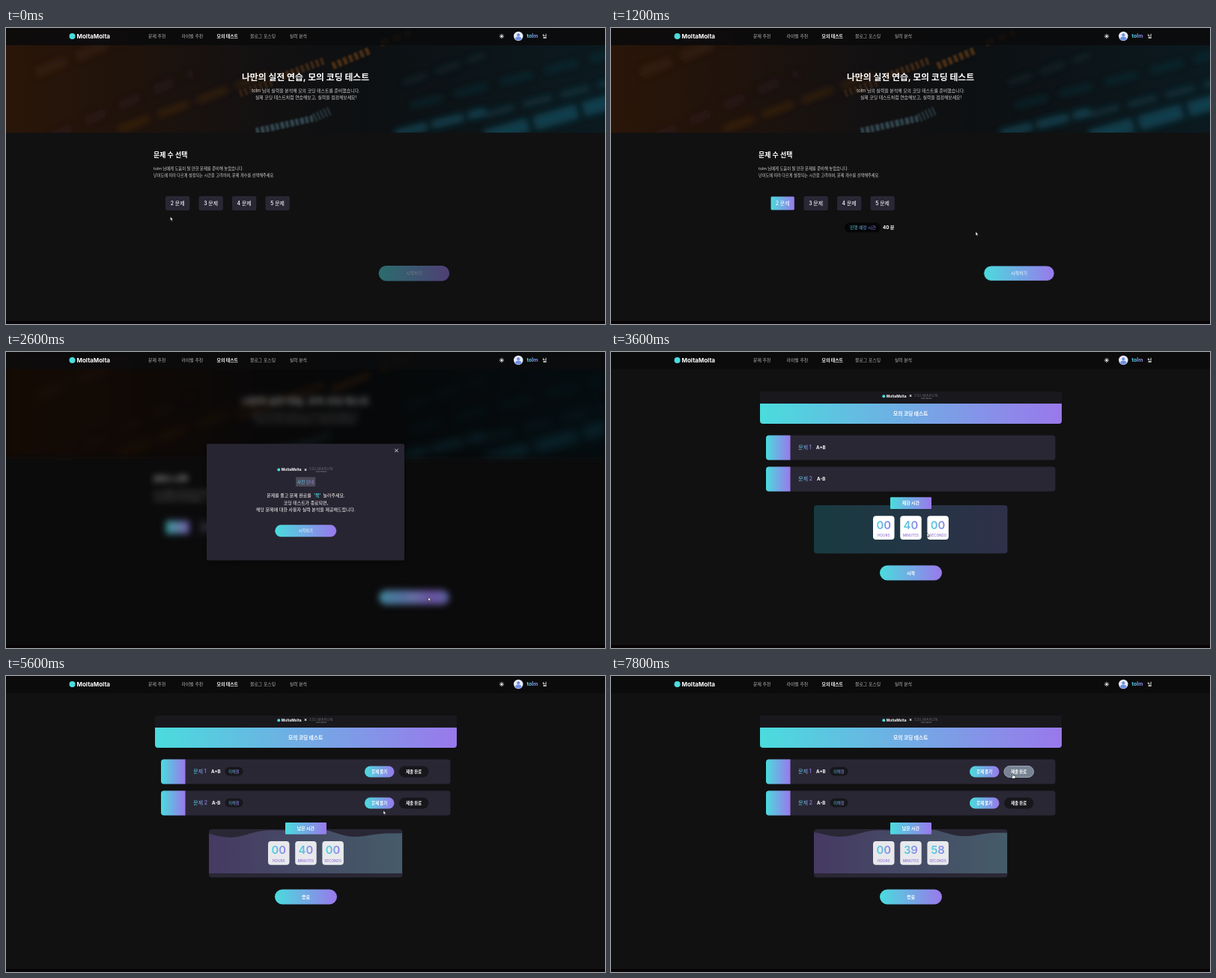
Animation of 800x396 px, one loop 8 s. Source, as an HTML page:

```html
<!DOCTYPE html>
<html lang="ko">
<head>
<meta charset="utf-8">
<title>모의 코딩 테스트</title>
<style>
  html, body { margin: 0; width: 100%; height: 100%; overflow: hidden; background: #111112; }
  svg { display: block; width: 100vw; height: 100vh; }
  text { font-family: Inter, "Noto Sans CJK KR", "Noto Sans CJK JP", sans-serif; white-space: pre; }
  .blurred { filter: blur(4px); }
</style>
</head>
<body>
<svg id="stage" viewBox="0 0 800 396"></svg>
<script>
const LOOP = 8000;
const BACK = '#111112', CYAN = '#4adcdd', PURPLE = '#9a78ec', PANEL = '#2a2735';
const SITE = 'MoltaMolta', PARTNER = 'SOLMARUN', USER = 'tolm';

// Markup helpers
const text = (x, y, str, size, { fill = '#fff', weight = 500, anchor = 'start', extra = '' } = {}) =>
  `<text x="${x}" y="${y}" font-size="${size}" font-weight="${weight}" fill="${fill}" text-anchor="${anchor}" ${extra}>${str}</text>`;
const mid = (x, y, str, size, opts) => text(x, y, str, size, { anchor: 'middle', ...opts });
const rect = (x, y, w, h, fill, r = 0, extra = '') =>
  `<rect x="${x}" y="${y}" width="${w}" height="${h}" rx="${r}" fill="${fill}" ${extra}/>`;
const gradient = (id, a, b) =>
  `<linearGradient id="${id}"><stop stop-color="${a}"/><stop offset="1" stop-color="${b}"/></linearGradient>`;
// Three-stop gradient twice as wide as its box, so that it can slide on hover
const slider = id =>
  `<linearGradient id="${id}" x1="0" x2="2"><stop stop-color="${CYAN}"/><stop offset=".5" stop-color="${PURPLE}"/><stop offset="1" stop-color="${CYAN}"/></linearGradient>`;
const streak = (x1, y1, x2, y2, color, width, opacity, dash = 'none') =>
  `<line x1="${x1}" y1="${y1}" x2="${x2}" y2="${y2}" stroke="${color}" stroke-width="${width}" opacity="${opacity}" stroke-dasharray="${dash}"/>`;

const GRAD = 'url(#brand)';

const defs = `<defs>
  ${gradient('brand', CYAN, PURPLE)}
  ${gradient('dim', '#183b40', '#2f3049')}
  ${gradient('wave', '#463a62', '#455c69')}
  ${slider('startFill')}${slider('runFill')}
  <linearGradient id="photo">
    <stop stop-color="#2a1609"/><stop offset=".22" stop-color="#1f130c"/>
    <stop offset=".42" stop-color="#131112"/><stop offset=".6" stop-color="#0d1012"/>
    <stop offset="1" stop-color="#0b1a20"/>
  </linearGradient>
  <filter id="soft" x="-20%" y="-20%" width="140%" height="140%"><feGaussianBlur stdDeviation="4"/></filter>
  <filter id="slight"><feGaussianBlur stdDeviation=".8"/></filter>
  <clipPath id="heroBox">${rect(0, 0, 800, 140, '#000')}</clipPath>
  <clipPath id="timerBox">${rect(271, 205, 258.5, 64.5, '#000', 4)}</clipPath>
</defs>`;

const rays = Array.from({ length: 8 }, (_, i) => {
  const angle = i * Math.PI / 4, dx = Math.cos(angle), dy = Math.sin(angle);
  return `<path d="M${662 + dx * 1.9} ${11 + dy * 1.9}L${662 + dx * 3.1} ${11 + dy * 3.1}" stroke="#fff" stroke-width=".9"/>`;
}).join('');

const NAV = [[190, '문제 추천'], [234.5, '라이벌 추천'], [281.5, '모의 테스트'], [326, '블로그 포스팅'], [378.7, '실력 분석']];
const header = rect(0, 0, 800, 23, '#0b0b0c', 0, 'opacity=".88"')
  + `<circle cx="88.5" cy="11" r="4" fill="${CYAN}"/>` + text(94.5, 14, SITE, 8, { weight: 700 })
  + NAV.map(([x, label], i) => text(x, 13, label, 5.9, i === 2 ? { weight: 700 } : { fill: '#b5b5b8', weight: 400 })).join('')
  + rays + '<circle cx="662" cy="11" r="1.5" fill="#fff"/>'
  + `<circle cx="684.3" cy="11" r="6.2" fill="#e9ebfb"/><circle cx="684.3" cy="9.3" r="2" fill="#6d8fe0"/>
     <path d="M680 15a4.3 3.6 0 0 1 8.6 0a6.2 6.2 0 0 1-8.6 0" fill="#6d8fe0"/>`
  + text(695.5, 13.2, USER, 7, { fill: GRAD, weight: 700 }) + text(716.5, 13.2, '님', 6.2, { weight: 600 });

const hero = `<g clip-path="url(#heroBox)">${rect(0, 0, 800, 140, 'url(#photo)')}
  <g filter="url(#soft)">
    ${streak(40, 60, 160, 12, '#4a2c22', 14, .35, '44 14')}${streak(150, 136, 350, 62, '#7a4212', 8, .28, '44 12')}
    ${streak(60, 146, 250, 60, '#3a2430', 12, .3, '30 20')}
    ${streak(520, 142, 640, 112, '#17637a', 12, .5, '44 6')}${streak(640, 146, 810, 98, '#15647a', 20, .5, '60 8')}
    ${streak(540, 104, 810, 34, '#14505f', 9, .25, '44 18')}${streak(640, 116, 810, 72, '#176074', 9, .3, '40 12')}
    ${streak(530, 74, 640, 36, '#2a4650', 8, .25, '34 12')}
  </g>
  <g filter="url(#slight)">
    ${streak(334, 138, 410, 121, '#55808f', 9, .5, '4 2.5 5 2')}${streak(412, 120, 432, 111, '#55808f', 12, .45, '2 3')}
    ${streak(312, 88, 358, 72, '#7c4a24', 10, .3, '4 3')}
    ${streak(368, 65, 424, 44, '#8a4f20', 10, .4, '4 3')}${streak(436, 51, 486, 30, '#96541e', 10, .45, '5 3')}
    ${streak(500, 20, 540, 6, '#a35a1d', 9, .4, '12 5')}
  </g></g>`
  + mid(400, 70, '나만의 실전 연습, 모의 코딩 테스트', 11.85, { weight: 700 })
  + mid(400.5, 86, `${USER} 님의 실력을 분석해 모의 코딩 테스트를 준비했습니다.`, 5.9, { fill: '#d6d6d8', weight: 400 })
  + mid(400.5, 95.3, '실제 코딩 테스트처럼 연습해보고, 실력을 점검해보세요!', 5.85, { fill: '#d6d6d8', weight: 400 });

const choices = [2, 3, 4, 5].map((n, i) => {
  const x = 213 + i * 44.5;
  return rect(x, 225, 32.3, 19, PANEL, 2, i ? '' : 'id="choice"') + mid(x + 16.1, 237.4, `${n} 문제`, 6.9);
}).join('');

const chooser = hero
  + text(197, 173, '문제 수 선택', 8.9, { weight: 600 })
  + text(197, 190.2, `${USER} 님에게 도움이 될 만한 문제를 준비해 놓았습니다.`, 5.3, { fill: '#d6d6d8', weight: 400 })
  + text(197, 199, '난이도에 따라 다르게 설정되는 시간을 고려하여, 문제 개수를 선택해주세요.', 5.17, { fill: '#d6d6d8', weight: 400 })
  + choices
  + `<g id="estimate">${rect(312, 260.7, 48, 12.6, '#050507', 6.3)}`
  + mid(336.3, 269.3, '진행 예정 시간', 5.75, { fill: GRAD }) + text(363, 269.4, '40 분', 6.2, { weight: 700 }) + '</g>'
  + `<g id="begin">${rect(497.7, 318, 94.5, 20.4, 'url(#startFill)', 10.2, 'id="beginBox"')}${mid(545, 330.4, '시작하기', 6)}</g>`;

const badges = y => `<circle cx="364.3" cy="${y}" r="2" fill="${CYAN}"/>`
  + text(367.8, y + 1.7, SITE, 4.8, { weight: 700 }) + mid(400, y + 2, '×', 6, { weight: 700 })
  + text(405, y + .8, PARTNER, 4.6, { fill: '#85838d', weight: 300, extra: 'letter-spacing=".75"' })
  + mid(421, y + 3.8, 'Code Practice', 2.2, { fill: '#85838d' });

const modal = rect(0, 23, 800, 369, '#000', 0, 'opacity=".32"')
  + rect(0, 23, 800, 117, '#000', 0, 'opacity=".25"')
  + rect(266, 122, 268, 160, '#000', 4, 'opacity=".3" filter="url(#soft)"')
  + rect(268, 122.7, 264, 156, '#282532', 2)
  + '<path d="M519.3 129.6l4.4 4.4m0-4.4l-4.4 4.4" stroke="#fff" stroke-width=".8"/>'
  + badges(157.6)
  + rect(387, 167.3, 26.3, 12.8, '#4b4958', 1) + mid(400.2, 176, '사전 안내', 5.8, { fill: GRAD })
  + mid(400.5, 194, `문제를 풀고 문제 완료를  <tspan fill="${CYAN}" font-weight="700">'꼭'</tspan>  눌러주세요.`, 5.95)
  + mid(400.5, 203.7, '코딩 테스트가 종료되면,', 5.95)
  + mid(400.5, 213.2, '해당 문제에 대한 사용자 실력 분석을 제공해드립니다.', 6)
  + rect(359.3, 231.3, 82, 16, GRAD, 8) + mid(400.3, 241.4, '시작하기', 5.2);

const row = (n, title, y, x) => rect(207, y, 386.5, 33, PANEL, 4)
  + `<path d="M239.5 ${y}H211q-4 0-4 4v25q0 4 4 4h28.5z" fill="${GRAD}"/>`
  + text(250.3, y + 18.8, `문제 ${n}`, 6.9, { fill: GRAD }) + text(x, y + 18.7, title, 6.2, { weight: 700 })
  + `<g class="running">${rect(292.5, y + 10.3, 24, 11.6, '#17161b', 5.8)}`
  + mid(304.4, y + 18.2, '미해결', 5.2, { fill: GRAD })
  + rect(479, y + 9, 39.5, 15, GRAD, 7.5) + mid(498.7, y + 18.5, '문제 풀기', 5.3, { weight: 600 })
  + rect(525, y + 9, 39.5, 15, '#17161b', 7.5, `id="submit${n}"`) + mid(544.7, y + 18.5, '제출 완료', 5.3, { weight: 600 }) + '</g>';

const cards = ['HOURS', 'MINUTES', 'SECONDS'].map((unit, i) => {
  const x = 350 + i * 36.2;
  return rect(x, 219.2, 28.5, 31.8, '#fff', 4, 'class="card"')
    + mid(x + 14.2, 236.7, '00', 14.8, { fill: GRAD, weight: 600, extra: 'class="digits"' })
    + mid(x + 14.2, 247.4, unit, 4.7, { fill: '#9273d8' });
}).join('');

const exam = rect(199, 53, 403, 16, '#19181d')
  + `<path d="M199 69H602v23q0 4-4 4H203q-4 0-4-4z" fill="${GRAD}"/>` + badges(59.3)
  + mid(400.2, 84.9, '모의 코딩 테스트', 6.7, { weight: 700 })
  + row(1, 'A+B', 111.5, 274) + row(2, 'A-B', 153.5, 275)
  + rect(271, 205, 258.5, 64.5, 'url(#dim)', 4, 'id="timerPanel"')
  + '<path id="wavePath" class="running" fill="url(#wave)" clip-path="url(#timerBox)"/>'
  + `<g id="timer">${rect(373, 194.2, 55, 15.8, GRAD, 1)}`
  + mid(400.4, 204.4, '', 6, { weight: 700, extra: 'id="timerLabel"' }) + cards + '</g>'
  + rect(359, 285.5, 83, 20, 'url(#runFill)', 10) + mid(400.4, 297.7, '', 6, { weight: 600, extra: 'id="runLabel"' });

const cursor = `<g id="cursor" stroke="#111" stroke-width=".5" stroke-linejoin="round" fill="#fff">
  <path id="arrow" d="M0 0V5.2L1.2 4.1L2 5.9L2.9 5.5L2.1 3.8H3.7Z"/>
  <path id="hand" d="M-.6 0q.6-.7 1.2 0V2.2L2.9 2.7q.7.2.6 1L3 6H-.7L-2.2 3.6q.2-.8 1.6.2Z"/></g>`;

const $ = id => document.getElementById(id);
$('stage').innerHTML = defs + rect(0, 0, 800, 396, BACK)
  + `<g id="chooser">${chooser}</g><g id="modal">${modal}</g><g id="exam">${exam}</g>`
  + header + rect(0, 392, 800, 4, '#080306') + cursor;

const all = name => [...document.querySelectorAll('.' + name)];
const running = all('running'), digits = all('digits'), cardBoxes = all('card');
const show = (el, on) => el.style.display = on ? '' : 'none';

// Moments of the story, in ms
const SELECT = 500, OPEN = 2000, EXAM = 3300, RUN = 5200, TICK = 5350;

// Cursor stops: time, x, y
const PATH = [[0, 219.5, 252.5], [200, 219.5, 252.5], [400, 228, 237], [750, 230, 237], [1200, 487, 272.5],
  [1600, 564, 328], [2600, 564, 328], [3050, 422, 242], [3650, 422, 242], [4300, 422.3, 287], [5200, 422.3, 287],
  [5600, 504, 180], [6000, 504, 176], [6600, 536.7, 131], [LOOP, 536.7, 131]];
// Time spans with the hand pointer
const HAND = [[350, 800], [1450, 2000], [2950, 3300], [4250, 5260], [6400, LOOP]];

const clamp = v => Math.min(1, Math.max(0, v));
const ease = v => v * v * (3 - 2 * v);
const ramp = (t, from, length) => ease(clamp((t - from) / length));

function cursorAt(t) {
  const i = PATH.findIndex((p, k) => k && t <= p[0]);
  const [t0, x0, y0] = PATH[i - 1], [t1, x1, y1] = PATH[i];
  const k = ease((t - t0) / (t1 - t0));
  return [x0 + (x1 - x0) * k, y0 + (y1 - y0) * k];
}

function wave(t) {
  const s = (t - 5600) / 2200;
  let d = 'M271 264';
  for (let x = 271; x <= 530; x += 3) {
    const y = 209 + (5 - s) * Math.cos((x - 297 - 5 * s) / 29.4) + 2 * Math.cos((x - 300) / 12.7 - s * .6);
    d += `L${x} ${y.toFixed(2)}`;
  }
  return d + 'V264Z';
}

function slide(id, amount) {
  $(id).setAttribute('x1', -amount);
  $(id).setAttribute('x2', 2 - amount);
}

function render(t) {
  const selected = t >= SELECT, inExam = t >= EXAM, started = t >= RUN;
  const inModal = t >= OPEN && !inExam;

  show($('chooser'), !inExam);
  show($('modal'), inModal);
  show($('exam'), inExam);
  $('chooser').classList.toggle('blurred', inModal);
  // Active buttons carry a thin edge in the page colour
  for (const id of ['choice', 'beginBox']) $(id).setAttribute('stroke', selected ? BACK : 'none');
  $('choice').setAttribute('fill', selected ? GRAD : PANEL);
  show($('estimate'), selected);
  $('begin').setAttribute('opacity', selected ? 1 : .45);
  slide('startFill', ramp(t, 1450, 400) - .75 * ramp(t, OPEN, 600));

  running.forEach(el => show(el, started));
  $('timerPanel').setAttribute('fill', started ? PANEL : 'url(#dim)');
  $('timer').setAttribute('transform', `translate(0 ${started ? 1.7 : 0})`);
  $('timerLabel').textContent = started ? '남은 시간' : '제한 시간';
  $('runLabel').textContent = started ? '종료' : '시작';
  cardBoxes.forEach(el => el.setAttribute('fill-opacity', started ? .88 : 1));
  slide('runFill', ramp(t, 4250, 400) - ramp(t, 5260, 300));
  if (started) $('wavePath').setAttribute('d', wave(t));

  const left = 2400 - Math.max(0, Math.floor((t - TICK) / 1000));
  [0, Math.floor(left / 60), left % 60].forEach((n, i) => digits[i].textContent = String(n).padStart(2, '0'));

  const submitHover = t >= 6450;
  $('submit1').setAttribute('fill', submitHover ? '#788494' : '#17161b');
  $('submit1').setAttribute('stroke', submitHover ? '#9aa6b5' : 'none');

  const hand = HAND.some(([a, b]) => t >= a && t < b);
  show($('hand'), hand);
  show($('arrow'), !hand);
  $('cursor').setAttribute('transform', `translate(${cursorAt(t).join(' ')})`);
}

const start = performance.now();
function frame(now) {
  render(Math.max(0, now - start) % LOOP);
  requestAnimationFrame(frame);
}
render(0);
requestAnimationFrame(frame);
</script>
</body>
</html>
```
